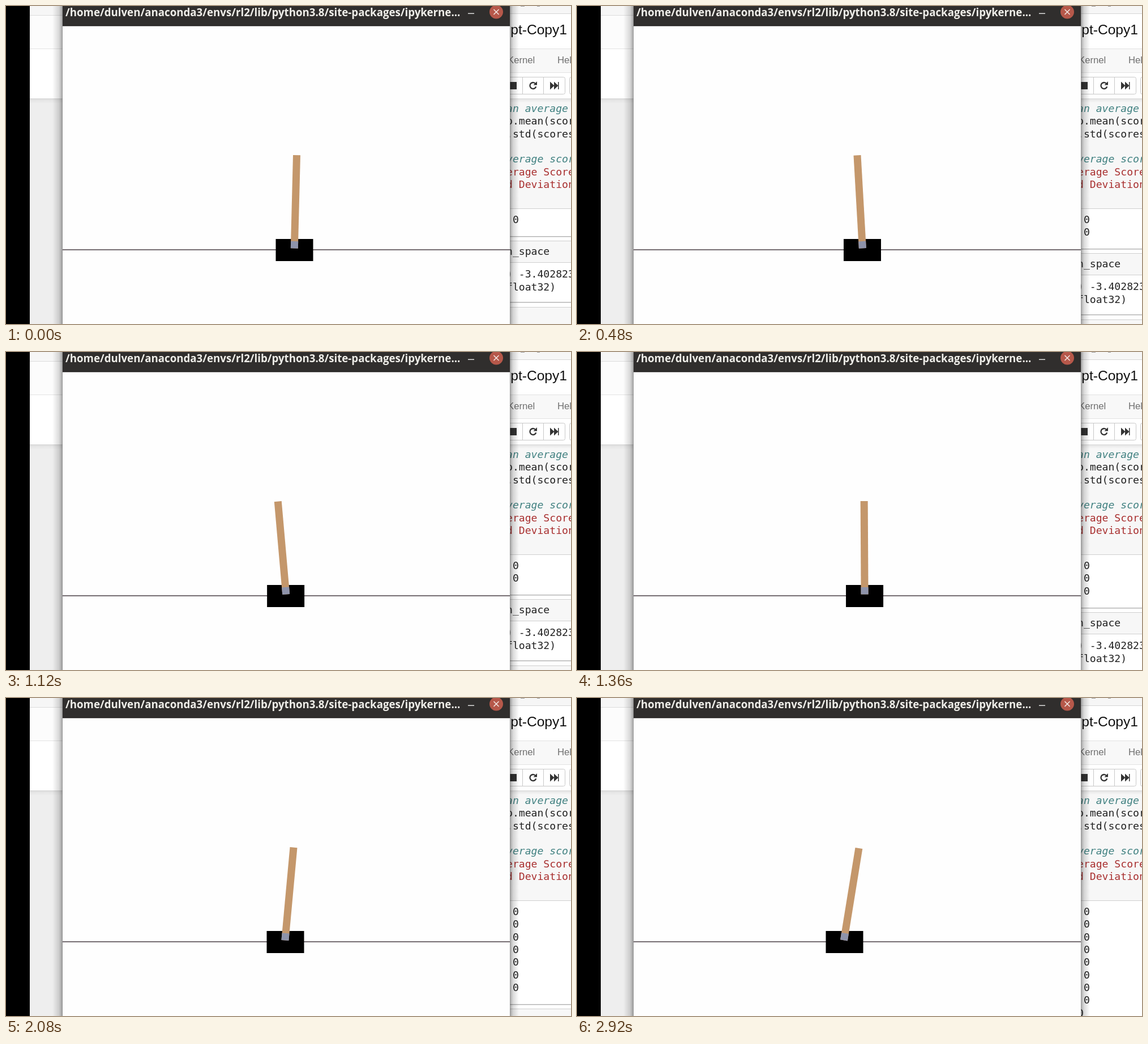
Write an HTML page with a canvas that moves like this. It is 998 by 561 pixels and loops after 2.96 s.

```html
<!DOCTYPE html>
<html lang="en">
<head>
<meta charset="utf-8">
<title>Cart pole</title>
<style>
html, body { margin: 0; width: 100%; height: 100%; overflow: hidden; background: #fff; }
canvas { display: block; }
</style>
</head>
<body>
<canvas id="stage" width="998" height="561"></canvas>
<script>
const ctx = document.getElementById('stage').getContext('2d');
const LOOP = 2960, STEP = 40, ROW = 22.35;
const MONO = '18.1px "DejaVu Sans Mono", monospace';
const SANS = '"Liberation Sans", Arial, sans-serif';

// start, end, printed rows, cart x and pole lean at both ends, easing power
const moves = [
  [0, 240, 1, 509.5, 4, 495, 32, 2],
  [240, 480, 2, 500, -2, 504, -9, 1],
  [480, 840, 2, 504, -9, 488.5, -5.5, 1],
  [840, 1320, 2, 488.5, -5.5, 505, -30, 2],
  [1320, 1500, 3, 509, -2.5, 490, 30, 2],
  [1500, 1680, 4, 493, 3, 515, -30, 2],
  [1680, 1840, 5, 498, -3, 476, 30, 2],
  [1840, 1960, 6, 490, 2, 508, -30, 2],
  [1960, 2200, 7, 499, 8.5, 477, 32.5, 2],
  [2200, 2480, 8, 497, -3, 515, -32, 2],
  [2480, 2960, 9, 491, -1.5, 469, 30.5, 2]
];

function rect(x, y, w, h, color) {
  ctx.fillStyle = color;
  ctx.fillRect(x, y, w, h);
}

function text(str, x, y, color = '#222', font = MONO, align = 'left') {
  ctx.font = font;
  ctx.fillStyle = color;
  ctx.textAlign = align;
  ctx.fillText(str, x, y);
}

function shade(x0, y0, x1, y1, box, alpha) {
  const g = ctx.createLinearGradient(x0, y0, x1, y1);
  g.addColorStop(0, `rgba(0,0,0,${alpha})`);
  g.addColorStop(0.35, `rgba(0,0,0,${alpha * 0.4})`);
  g.addColorStop(1, 'rgba(0,0,0,0)');
  rect(...box, g);
}

function stroke(points, color, width) {
  ctx.beginPath();
  points.forEach(([x, y], i) => i ? ctx.lineTo(x, y) : ctx.moveTo(x, y));
  ctx.strokeStyle = color;
  ctx.lineWidth = width;
  ctx.stroke();
}

function fill(points, color) {
  ctx.beginPath();
  points.forEach(([x, y]) => ctx.lineTo(x, y));
  ctx.fillStyle = color;
  ctx.fill();
}

function drawPage() {
  rect(0, 0, 998, 561, '#fff');
  rect(42, 0, 956, 16, '#f6f6f6');
  rect(42, 16, 58, 1, '#ddd');
  rect(42, 17, 58, 58, '#fcfcfc');
  rect(42, 75, 58, 1, '#e3e3e3');
  rect(42, 163, 58, 398, '#eee');
  shade(0, 163, 0, 172, [42, 163, 58, 9], 0.1);
  rect(0, 0, 42, 561, '#000');

  rect(880, 13, 118, 1, '#d5d5d5');
  rect(880, 14, 118, 62, '#fff');
  rect(909, 0, 7, 1, '#999');
  rect(938, 0, 5, 1, '#999');
  text('pt-Copy1', 991, 50, '#111', '24.6px ' + SANS, 'right');
  rect(880, 75, 118, 42, '#f8f8f8');
  rect(880, 75, 118, 1, '#e3e3e3');
  rect(880, 117, 118, 1, '#e3e3e3');
  text('Kernel', 886, 101, '#707070', '16.7px ' + SANS);
  text('Help', 974, 101, '#707070', '16.7px ' + SANS);
  drawToolbar();
}

function drawToolbar() {
  ctx.strokeStyle = '#c8c8c8';
  ctx.lineWidth = 1;
  ctx.beginPath();
  ctx.roundRect(870.5, 125.5, 117, 30, 3);
  ctx.roundRect(995.5, 125.5, 40, 30, 3);
  ctx.stroke();
  rect(912, 126, 1, 30, '#c8c8c8');
  rect(949, 126, 1, 30, '#c8c8c8');
  rect(888, 134, 14, 13, '#333');

  ctx.beginPath();
  ctx.arc(931, 140.5, 5.5, 0.3, 5.5);
  ctx.strokeStyle = '#333';
  ctx.lineWidth = 2.3;
  ctx.stroke();
  fill([[938, 133], [938, 139.5], [931.5, 139.5]], '#333');
  for (const x of [961, 968]) fill([[x, 133.5], [x + 7.5, 140.5], [x, 147.5]], '#333');
  rect(975, 134, 1.5, 13, '#333');
}

function drawCells(rows) {
  rect(880, 163, 118, 194, '#f7f7f7');
  shade(0, 163, 0, 171, [880, 163, 118, 8], 0.12);
  const comment = 'italic ' + MONO;
  text('an average', 884, 187, '#408080', comment);
  text('p.mean(scores', 884, 209);
  text('.std(scores', 884, 231.5);
  text('verage score', 884, 276, '#408080', comment);
  text('erage Score', 884, 298.5, '#a93030');
  text('d Deviation', 884, 321, '#a93030');
  rect(880, 357, 118, 1, '#cfcfcf');

  for (let i = 0; i < rows; i++) text('0', i === 8 ? 884 : 895, 383 + i * ROW);

  const dy = Math.round((rows - 1) * ROW);
  rect(880, 406 + dy, 118, 1.5, '#b5b5b5');
  rect(880, 414 + dy, 118, 39, '#f7f7f7');
  rect(880, 414 + dy, 118, 1, '#cfcfcf');
  rect(880, 452 + dy, 118, 1, '#cfcfcf');
  text('n_space', 884, 439 + dy);
  text(') -3.4028235', 884, 479 + dy);
  text('float32)', 884, 501.5 + dy);
  rect(880, 522 + dy, 118, 1.5, '#b5b5b5');
  rect(880, 531 + dy, 118, 60, '#f7f7f7');
  rect(880, 531 + dy, 118, 1, '#cfcfcf');
}

function drawWindow() {
  shade(100, 0, 82, 0, [82, 0, 18, 561], 0.36);
  shade(890, 0, 906, 0, [890, 0, 16, 561], 0.36);
  rect(99.5, 0, 791, 561, '#8a8a8a');
  rect(100, 0, 790, 561, '#fefefe');
  rect(100, 0, 790, 35, '#302e2d');
  rect(100, 34, 790, 1.5, '#1d1b1a');
  text('/home/dulven/anaconda3/envs/rl2/lib/python3.8/site-packages/ipykerne...',
    105, 18, '#efeee9', 'bold 18.7px "Open Sans", sans-serif');
  rect(816, 12.5, 11, 1.5, '#ddd');
  ctx.beginPath();
  ctx.arc(866, 10.5, 12, 0, 7);
  ctx.fillStyle = '#b6584a';
  ctx.fill();
  stroke([[861.5, 6], [870.5, 15]], '#f3e6e2', 1.6);
  stroke([[870.5, 6], [861.5, 15]], '#f3e6e2', 1.6);
}

function drawCart(x, lean) {
  rect(100, 429.3, 790, 1.5, '#493f45');
  rect(x - 33, 411, 66, 39, '#000');
  ctx.save();
  ctx.translate(x, 421);
  ctx.rotate(Math.asin(lean / 158));
  rect(-6.5, -158, 13, 164.5, '#c4976b');
  rect(-6.5, -6, 13, 12.5, '#8e93aa');
  ctx.restore();
}

function draw(now) {
  const t = Math.floor(now % LOOP / STEP) * STEP;
  const [start, end, rows, x0, lean0, x1, lean1, power] = moves.find(m => t < m[1]);
  const k = ((t - start) / (end - start)) ** power;
  drawPage();
  drawCells(rows);
  drawWindow();
  drawCart(x0 + (x1 - x0) * k, lean0 + (lean1 - lean0) * k);
}

const began = performance.now();
function tick() {
  draw(performance.now() - began);
  requestAnimationFrame(tick);
}
tick();
</script>
</body>
</html>
```
